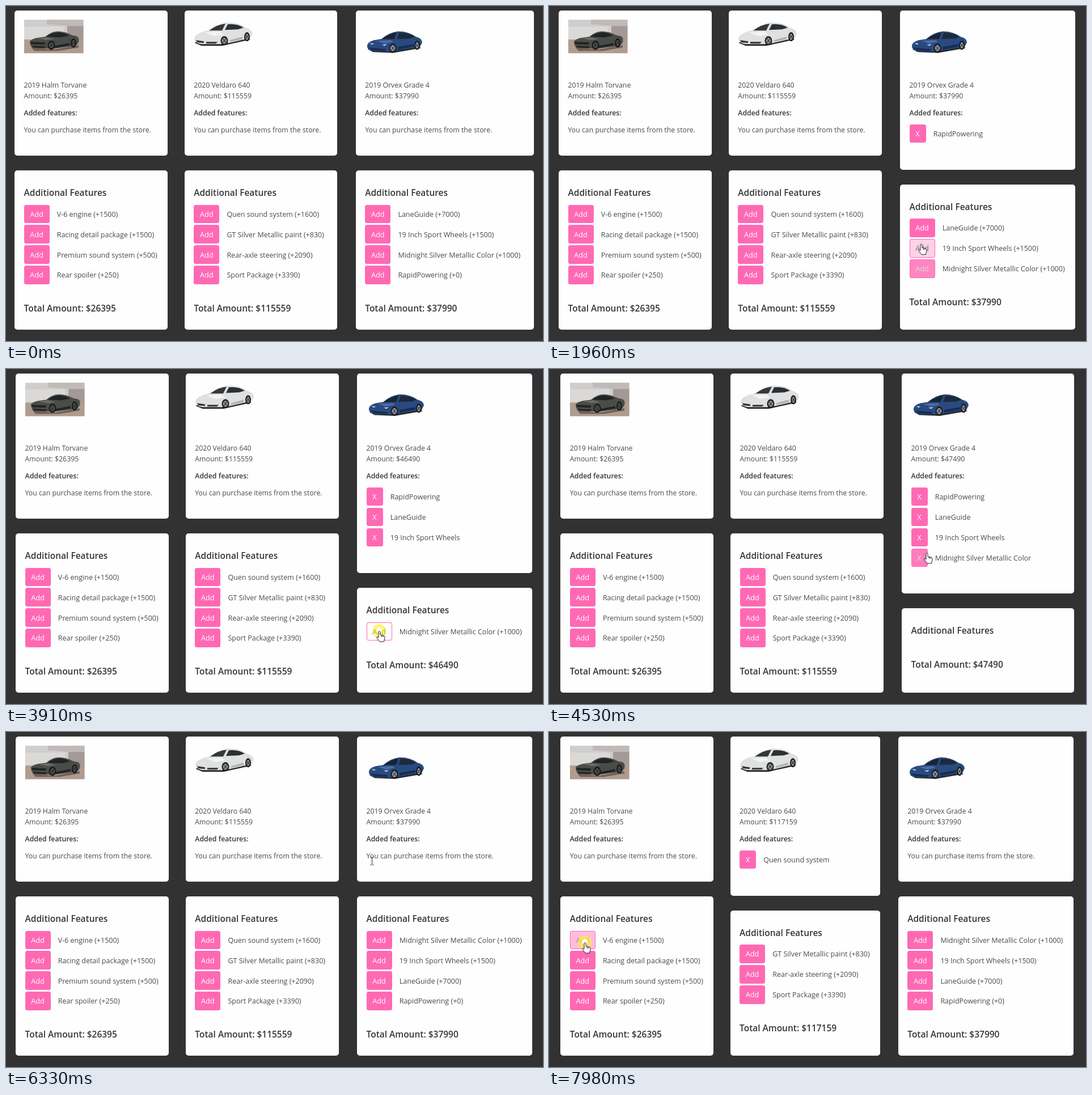
These frames come from a looping animation (947x591 px, 8000 ms). An HTML page:

```html
<!DOCTYPE html>
<html lang="en">
<head>
<meta charset="utf-8">
<title>Car store</title>
<style>
html, body { margin: 0; width: 100%; height: 100%; overflow: hidden; background: #323232; }
svg { display: block; width: 947px; height: 591px; }
text { font: 12.3px "Open Sans", "Noto Sans", sans-serif; fill: #4a4a4a; }
.strong { font-weight: 600; fill: #363636; }
.title { font-size: 15.5px; font-weight: 600; fill: #363636; }
.label { font-size: 12.5px; }
.btn { font-size: 12.7px; text-anchor: middle; }
</style>
</head>
<body>
<svg id="stage" viewBox="0 0 947 591"></svg>
<script>
const LOOP = 8000, ROW = 35.9;
const stage = document.getElementById('stage');

const wheels = (x1, y1, x2, y2, rim) => [[x1, y1, 6.5], [x2, y2, 5]].map(([x, y, rx]) =>
  `<ellipse cx="${x}" cy="${y}" rx="${rx}" ry="8" fill="#18191b"/>
   <ellipse cx="${x}" cy="${y}" rx="${rx - 2}" ry="5.500" fill="${rim}"/>
   <path d="M${x - 3} ${y - 4}L${x + 3} ${y + 4}M${x - 3} ${y + 4}L${x + 3} ${y - 4}" stroke="#222"/>`).join('');

const photos = [
  `<path d="M0 0H104.5V59H0Z" fill="#cfcecd"/>
   <path d="M0 12H70V34H0Z" fill="#dad9d8"/>
   <path d="M40 0H104.5V13L40 8Z" fill="#bfbab8"/>
   <path d="M76 11H104.5V37H76Z" fill="#a39a97"/>
   <path d="M0 35H104.5V59H0Z" fill="#b09c8e"/>
   <path d="M12 48L50 53L96 45V49L60 55H18Z" fill="#6f6159"/>
   <path d="M10 38Q13 34 22 32L37 30Q47 21 58 20.500Q72 20 84 27L93 29Q98 32 96 40L92 45L84 47L50 51L16 50Q10 47 10 38Z" fill="#4a4c48"/>
   <path d="M39 30Q48 23 58 22.500Q70 22 79 28L64 31Z" fill="#1f2425"/>
   <path d="M11 39L37 40L36 44L12 43ZM13 46L38 47L36 50L16 49ZM54 46L80 41V45L54 50Z" fill="#222423"/>
   <path d="M24 33L40 31L54 34L40 36Z" fill="#6b6d69"/>` + wheels(48, 45, 87, 41, '#4b4c4c'),
  `<path d="M2 41L14 46L50 46L100 35L94 31H10Z" fill="#28292b"/>
   <path d="M1 33Q2 25 20 20L28 18Q42 7 58 5Q80 4 92 14Q103 17 104 25L100 32L88 35L62 41L48 43L14 43Q1 41 1 33Z" fill="#dfe0e0"/>
   <path d="M27 19Q42 8 56 7L50 19Z" fill="#33383d"/>
   <path d="M55 18L60 8Q76 6 88 14L78 17Z" fill="#2b3034"/>
   <path d="M4 36L18 38V41L6 40ZM22 39H42L39 42H22Z" fill="#343639"/>
   <path d="M64 36L86 30V34L64 39Z" fill="#aeb0b2"/>
   <path d="M20 22L46 21L54 26L36 29Z" fill="#f3f3f3"/>` + wheels(54, 37, 94, 30, '#8b8d90'),
  `<path d="M5 52L14 57L50 58.500L99 50L90 44H12Z" fill="#292b31"/>
   <path d="M4 45Q5 39 16 36L29 34Q43 22 58 20.500Q76 20 90 30Q100 32 101 40L97 48L86 49L58 54L44 56L12 55Q3 52 4 45Z" fill="#284a80"/>
   <path d="M30 34Q44 24 56 22.500L52 34Z" fill="#1b2331"/>
   <path d="M56 34L60 23Q76 22 88 30L80 33Z" fill="#1f2938"/>
   <path d="M20 37L46 36L50 39L34 42Z" fill="#4a6da4"/>
   <path d="M6 49L38 52L36 55L13 54ZM58 48L86 43V47L58 53Z" fill="#162c52"/>
   <path d="M8 41L16 42L13 44ZM30 44L39 43L35 46Z" fill="#cfd6e2"/>` + wheels(49, 50, 92, 45, '#8e939b')
];

const LONG = 'Midnight Silver Metallic Color';
const cars = [
  { name: '2019 Halm Torvane', price: 26395, items: { 'V-6 engine': 1500, 'Racing detail package': 1500, 'Premium sound system': 500, 'Rear spoiler': 250 } },
  { name: '2020 Veldaro 640', price: 115559, items: { 'Quen sound system': 1600, 'GT Silver Metallic paint': 830, 'Rear-axle steering': 2090, 'Sport Package': 3390 } },
  { name: '2019 Orvex Grade 4', price: 37990, items: { 'LaneGuide': 7000, '19 Inch Sport Wheels': 1500, [LONG]: 1000, 'RapidPowering': 0 } }
];

// time, car, feature moved to the other list
const moves = [
  [1500, 2, 'RapidPowering'], [2510, 2, 'LaneGuide'], [3510, 2, '19 Inch Sport Wheels'],
  [3990, 2, LONG], [4850, 2, LONG], [5400, 2, '19 Inch Sport Wheels'],
  [5770, 2, 'LaneGuide'], [6330, 2, 'RapidPowering'], [7270, 1, 'Quen sound system']
];

// left edge and width of each column
const wide = [[15.2, 269.3], [314.9, 269.3], [616.9, 314]];
const mid = [[17.2, 269.6], [317, 269.8], [619.2, 309]];
const narrow = [[20.4, 269.5], [320.2, 269.8], [622.2, 303.6]];
const last = [[20.4, 269.5], [319.7, 263.8], [615.9, 309]];
const layouts = [[0, wide], [1500, mid], [3990, narrow], [5400, mid], [7270, last]];

const path = [
  [190, 582, 588], [900, 648.5, 470.5], [1500, 648.5, 470.5], [2270, 660, 391.5], [2510, 660, 391.5],
  [2890, 663, 402], [3220, 660, 424], [3510, 660, 424], [3800, 658, 462], [4000, 658, 462],
  [4450, 682, 333], [4530, 666, 324], [4700, 658, 326], [4850, 658, 326], [5120, 657, 294],
  [5400, 657, 294], [5620, 655, 261], [5770, 655, 261], [6020, 645.5, 227], [6400, 645.5, 227],
  [7050, 360, 368], [7270, 360, 368], [7960, 63, 371], [8000, 63, 371]
];
const clicks = [1350, 2360, 3360, 3860, 4700, 5250, 5620, 6160, 7120, 7980];

function pointer(t) {
  const i = path.findIndex(p => p[0] > t);
  if (i < 1) return null;
  const [t0, x0, y0] = path[i - 1], [t1, x1, y1] = path[i];
  const u = (t - t0) / (t1 - t0), e = u * u * (3 - 2 * u);
  return [x0 + (x1 - x0) * e, y0 + (y1 - y0) * e];
}

function columns(t) {
  const layout = layouts.filter(l => l[0] <= t).pop()[1];
  return cars.map((car, c) => {
    let added = [], rest = Object.keys(car.items);
    for (const [at, who, item] of moves) {
      if (at > t || who !== c) continue;
      if (rest.includes(item)) {
        rest = rest.filter(i => i !== item);
        added.push(item);
      } else {
        added = added.filter(i => i !== item);
        rest.push(item);
      }
    }
    const [left, width] = layout[c], x = left + 16.3;
    const wraps = layout === narrow && rest.includes(LONG);
    const bottom = added.length ? 253 + 35.75 * added.length - (wraps ? 3.3 : 0) : 264;
    const top = bottom + 26.2;
    const first = top + 60.4 + (wraps ? 3.3 : 0);
    const buttons = [
      ...added.map((item, i) => ({ key: c + 'X' + item, x, y: 208.8 + i * ROW, w: 29, text: 'X', label: [item] })),
      ...rest.map((item, i) => {
        const cost = `(+${car.items[item]})`;
        return { key: c + 'A' + item, x, y: first + i * ROW, w: 45, text: 'Add',
          label: wraps && item === LONG ? [item, cost] : [item + ' ' + cost] };
      })
    ];
    const total = car.price + added.reduce((sum, i) => sum + car.items[i], 0);
    const totalY = top + 105.2 + rest.length * ROW + (wraps ? 6.5 : 0);
    return { c, car, left, width, x, bottom, top, added, buttons, total, totalY };
  });
}

function hit(t) {
  const p = pointer(t);
  if (!p) return null;
  const b = columns(t).flatMap(col => col.buttons).find(b =>
    p[0] >= b.x && p[0] <= b.x + b.w && p[1] >= b.y && p[1] <= b.y + 32.5);
  return b ? b.key : null;
}

const text = (x, y, s, cls = '', fill = '') =>
  `<text x="${x}" y="${Math.round(y)}" class="${cls}"${fill && ` style="fill:${fill}"`}>${s}</text>`;
const mix = (a, b, u) => `rgb(${a.map((v, i) => Math.round(v + (b[i] - v) * u))})`;

// box with its edges on whole pixels
function box(x, y, w, h, r, fill) {
  const [l, t, right, bottom] = [x, y, x + w, y + h].map(Math.round);
  return `<rect x="${l}" y="${t}" width="${right - l}" height="${bottom - t}" rx="${r}" fill="${fill}"/>`;
}

function button(b, hover) {
  const y = b.y + 21.1, l = Math.round(b.x), t = Math.round(b.y), end = Math.round(b.y + 32.5);
  const lines = b.label.length > 1 ? [y - 9.8, y + 9.8] : [y];
  return box(l, t, b.w, end - t, 3.5, '#ff69b4') +
    box(l + 1, t + 1, b.w - 2, end - t - 2, 2.5, mix([255, 105, 180], [255, 255, 255], hover)) +
    text(b.x + b.w / 2, y, b.text, 'btn', mix([255, 255, 255], [54, 54, 54], hover)) +
    b.label.map((s, i) => text(b.x + b.w + 13.2, lines[i], s, 'label')).join('');
}

function column(col, hover) {
  const { car, left, width, x, bottom, top, total } = col;
  return box(left, 8, width, bottom - 8, 5, '#fefefe') + box(left, top, width, 571 - top, 5, '#fefefe') +
    `<g transform="translate(${Math.round(x)} 24.300)">${photos[col.c]}</g>` +
    text(x, 144, car.name) +
    text(x, 163, 'Amount: $' + total) +
    text(x, 193, 'Added features:', 'strong') +
    (col.added.length ? '' : text(x, 223, 'You can purchase items from the store.')) +
    text(x, top + 45, 'Additional Features', 'title') +
    col.buttons.map(b => button(b, hover(b.key))).join('') +
    text(x, col.totalY, 'Total Amount: $' + total, 'title');
}

const shapes = {
  arrow: '<path d="M.5 .5V14L3.700 11L6 16L8 15L5.800 10.300H10Z" fill="#fff" stroke="#222"/>',
  hand: `<path d="M-1 1.500Q.5 -.5 2 1.500V7L9 8.500Q10.500 9 10 12L8.500 19H1L-4 12.500Q-5 10.500 -3 10.500L-1 12Z"
    fill="#fff" stroke="#222"/><path d="M4.500 7.500V11M7 8V11" stroke="#222"/>`,
  beam: '<path d="M-3 -6.500H-1L0 -5.500L1 -6.500H3M0 -5.500V6.500M-3 7.500H-1L0 6.500L1 7.500H3" fill="none" stroke="#333"/>'
};

function cursor(t, over) {
  const p = pointer(t);
  if (!p) return '';
  const shape = over ? 'hand' : t >= 6330 && t < 6480 ? 'beam' : 'arrow';
  const glow = clicks.some(c => t >= c && t < c + 150)
    ? '<circle r="12" fill="#fff030" opacity=".65"/><circle r="5" cy="-1" fill="#fffef0"/>' : '';
  return `<g transform="translate(${p})">${glow}${shapes[shape]}</g>`;
}

function render(t) {
  // share of the last 240 ms spent over a button gives its fade
  const recent = Array.from({ length: 16 }, (_, i) => hit(Math.max(0, t - i * 15)));
  const hover = key => recent.filter(k => k === key).length / 16;
  stage.innerHTML = columns(t).map(col => column(col, hover)).join('') + cursor(t, recent[0]);
}

const start = performance.now();
function frame() {
  render((performance.now() - start) % LOOP);
  requestAnimationFrame(frame);
}
frame();
</script>
</body>
</html>
```
